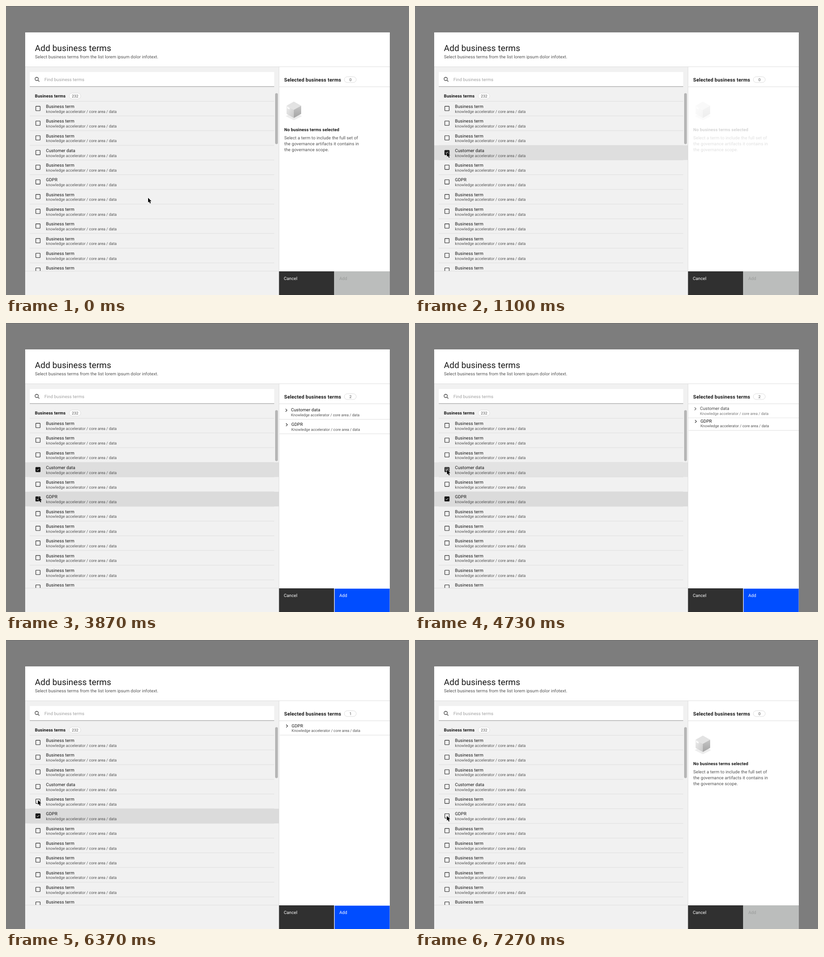
An HTML page that plays this animation: 882x635 px, repeating every 8.31 s.

```html
<!DOCTYPE html>
<html lang="en">
<head>
<meta charset="utf-8">
<title>Add business terms</title>
<style>
  html, body { margin: 0; width: 100%; height: 100%; overflow: hidden; background: #7d7d7d; }
  svg { display: block; }
  text { font: 9.6px Roboto, Inter, sans-serif; letter-spacing: .07px; fill: #161616; text-rendering: geometricPrecision; }
  .title { font-size: 18.67px; letter-spacing: .1px; }
  .bold { font-size: 9.4px; font-weight: 600; letter-spacing: .12px; }
  .large { font-size: 10.8px; letter-spacing: .22px; }
  .small { font-size: 8.6px; letter-spacing: 0; fill: #525252; }
  .side { font-size: 8.3px; }
  .soft { fill: #525252; }
  .hint { fill: #a0a0a0; }
  .white { fill: #fff; }
  .rule { stroke: #dedede; }
  .pill { fill: #fff; stroke: #dcdcdc; }
  .icon { fill: none; stroke: #222; stroke-width: 1.1; }
</style>
</head>
<body>
<svg width="882" height="635" viewBox="0 0 882 635">
  <defs>
    <clipPath id="listClip"><rect x="42" y="178" width="556" height="405"/></clipPath>
    <clipPath id="sideClip"><rect x="598" y="178" width="242" height="405"/></clipPath>
    <linearGradient id="leftFace" x2="1" y2="1"><stop stop-color="#eee"/><stop offset="1" stop-color="#c8c8c8"/></linearGradient>
    <linearGradient id="rightFace" x2="0" y2="1"><stop stop-color="#c6c6c6"/><stop offset="1" stop-color="#a4a4a4"/></linearGradient>
  </defs>
  <rect width="882" height="635" fill="#7d7d7d"/>
  <rect width="882" height="1" fill="#696969"/>
  <rect x="42" y="58" width="798" height="577" fill="#fff"/>
  <text class="title" x="63.3" y="99">Add business terms</text>
  <text class="soft" x="63.5" y="115">Select business terms from the list lorem ipsum dolor infotext.</text>

  <rect x="42" y="134" width="556" height="501" fill="#f1f1f1"/>
  <path class="rule" d="M42 133.5H840"/>
  <rect x="52" y="145" width="535" height="32" fill="#fff"/>
  <path stroke="#8d8d8d" d="M52 177H587"/>
  <path class="icon" d="M70.3 163.3l2.7 2.7"/><circle class="icon" cx="67.2" cy="160.2" r="3.6"/>
  <text class="hint" x="84" y="164.5">Find business terms</text>
  <text class="bold" x="63.3" y="201">Business terms</text>
  <rect class="pill" x="138.5" y="191.5" width="25" height="12.5" rx="6.2"/>
  <text class="small" x="151.2" y="201" text-anchor="middle">232</text>
  <g id="list" clip-path="url(#listClip)"></g>
  <rect x="589" y="191.5" width="6" height="112" rx="3" fill="#b6b6b6"/>
  <path class="rule" d="M42 582.5H598M597.5 134V583"/>

  <text class="bold large" x="608.8" y="165.8">Selected business terms</text>
  <rect class="pill" x="740.5" y="155.5" width="26" height="12.5" rx="6.2"/>
  <text class="small" id="count" x="753.8" text-anchor="middle"></text>
  <path class="rule" d="M598 177.5H840"/>
  <g id="empty">
    <path fill="#ededed" d="M630 233l18 9-18 9-18-9z"/>
    <path fill="#e3e3e3" d="M630 210l16 9-16 9-16-9z"/>
    <path fill="url(#leftFace)" d="M614 219l16 9v18l-16-9z"/>
    <path fill="url(#rightFace)" d="M646 219l-16 9v18l16-9z"/>
    <path fill="#fff" d="M615.5 221.5l5 2.8v3l-5-2.8z"/>
    <text class="bold" x="609" y="274.5">No business terms selected</text>
    <text class="soft" x="609" y="293.3">Select a term to include the full set of</text>
    <text class="soft" x="609" y="306.2">the governance artifacts it contains in</text>
    <text class="soft" x="609" y="319">the governance scope.</text>
  </g>
  <g id="chosen" clip-path="url(#sideClip)"></g>

  <rect x="597.5" y="583" width="120.5" height="52" fill="#303030"/>
  <text class="white" x="608" y="602">Cancel</text>
  <rect x="718" y="583" width="122" height="52" fill="#bbbdbc"/>
  <text x="729.5" y="602" style="fill:#999b9a">Add</text>
  <g id="add">
    <rect x="718" y="583" width="122" height="52" fill="#fff"/>
    <rect x="719.2" y="583.7" width="120.5" height="52" fill="#004dff"/>
    <text class="white" x="729.5" y="602">Add</text>
  </g>
  <path id="cursor" d="M0 0v10.2l2.3-2 1.7 4 1.9-.8-1.7-3.8h3.1z" stroke="#fff" paint-order="stroke"/>
</svg>
<script>
const LOOP = 8310, PITCH = 32.28;
const $ = id => document.getElementById(id);
const names = { 3: 'Customer data', 5: 'GDPR' };
const shades = { 3: '#dedede', 5: '#dbdbdb' };

let rows = '', rules = '';
for (let i = 0; i < 12; i++) {
  const y = 209.3 + i * PITCH;
  rules += `<path class="rule" d="M52 ${y}H587"/>`;
  if (names[i]) rows += `<rect id="fill${i}" x="42" y="${y}" width="555.5" height="${PITCH}" fill="${shades[i]}"/>`;
  rows += `<rect x="65.2" y="${y + 11.1}" width="9.6" height="9.6" rx=".8" fill="none" stroke="#262626" stroke-width="1.1"/>`;
  if (names[i]) rows += `<g id="check${i}"><rect x="64.7" y="${y + 10.6}" width="10.6" height="10.6" rx="1" fill="#161616"/>
    <path d="M67.4 ${y + 16}l1.8 1.8 3.5-3.6" fill="none" stroke="#fff"/></g>`;
  rows += `<text x="87.6" y="${y + 14.7}">${names[i] || 'Business term'}</text>
    <text class="small" x="87.6" y="${y + 25.5}">knowledge accelerator / core area / data</text>`;
}
$('list').innerHTML = rows + rules;

// Each item's origin is the vertical centre of its label.
$('chosen').innerHTML = [3, 5].map(i => `<g id="item${i}">
  <path class="icon" d="M-11.8-2l3.1 3.1-3.1 3.1"/><text y="3.5">${names[i]}</text>
  <text class="small side" y="14.2">Knowledge accelerator / core area / data</text>
  <path class="rule" d="M-26 21H217"/></g>`).join('');

const out = (t, from, to, power = 3) =>
  1 - (1 - Math.min(1, Math.max(0, (t - from) / (to - from)))) ** power;
const mix = (a, b, p) => a + (b - a) * p;
const fade = (id, p) => $(id).setAttribute('opacity', p);
const move = (id, x, y) => $(id).setAttribute('transform', `translate(${x} ${y})`);

const path = [[30, 630, 70, 321], [1970, 2400, 71.3, 382], [3870, 4400, 70, 322.5], [6300, 6570, 69.7, 386.5]];
const counts = [[-999, 0], [1130, 1], [2780, 2], [4740, 1], [6760, 0]];

function render(t) {
  let x = 311, y = 421.5;
  for (const [from, to, endX, endY] of path) {
    const p = out(t, from, to, 2);
    x = mix(x, endX, p);
    y = mix(y, endY, p);
  }
  move('cursor', x, y);

  const marked = {
    3: out(t, 970, 1170) - out(t, 4700, 5000),
    5: out(t, 2730, 2930) - out(t, 6730, 7030)
  };
  for (const i in marked) {
    fade('fill' + i, marked[i]);
    fade('check' + i, marked[i]);
  }

  const enter3 = out(t, 1130, 1370), leave3 = out(t, 4700, 5100);
  const enter5 = out(t, 2730, 3000), leave5 = out(t, 6730, 7030);
  fade('item3', enter3 - leave3);
  move('item3', 623.7, 190.6 - 15 * (1 - enter3 + leave3));
  fade('item5', enter5 - leave5);
  move('item5', mix(624.6, 625.1, leave3), mix(222.5, 188, leave3) - 15 * (1 - enter5 + leave5));

  fade('empty', 1 - out(t, 970, 1270) + out(t, 6860, 7270));
  fade('add', out(t, 1130, 1370) - out(t, 6730, 6830));

  const [since, value] = counts.filter(c => t >= c[0]).pop();
  $('count').textContent = value;
  $('count').setAttribute('y', 165 + 3 * (1 - out(t, since, since + 200)));
}

const start = performance.now();
function tick() {
  render((performance.now() - start) % LOOP);
  requestAnimationFrame(tick);
}
tick();
</script>
</body>
</html>
```
